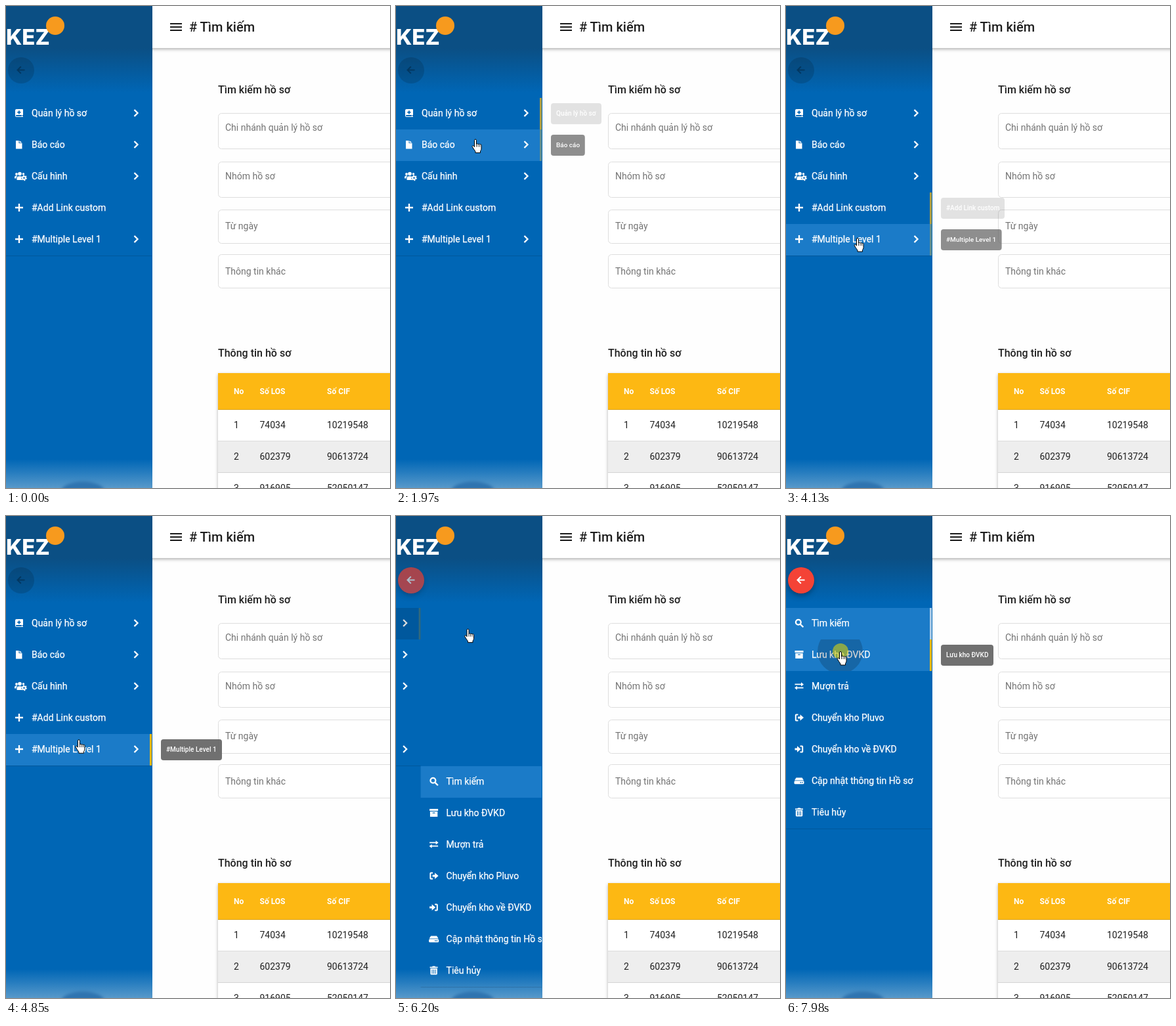
These frames come from a looping animation (585x734 px, 8 s). An HTML page:

```html
<!DOCTYPE html>
<html lang="vi">
<head>
<meta charset="utf-8">
<title>Menu</title>
<style>
html, body { margin: 0; width: 100%; height: 100%; overflow: hidden; background: #fff; }
body { font-family: Roboto, sans-serif; }
#stage { position: absolute; left: 0; top: 0; width: 585px; height: 734px; overflow: hidden; background: #fefefe; }
#stage div, #stage svg { position: absolute; }
#page { left: 0; top: 0; }
#side {
  left: 0; top: 0; width: 223px; height: 734px; overflow: hidden;
  background:
    linear-gradient(rgba(150, 190, 220, 0) 690px, rgba(150, 190, 220, .25) 710px, rgba(160, 195, 220, .55) 734px),
    linear-gradient(#0b4f84 64px, #0066b5 132px);
}
#hill { left: 84px; top: 724px; width: 66px; height: 30px; border-radius: 50%; background: #2f74b0; filter: blur(2px); }
#brand { left: 0; top: 27px; font: 800 33px/40px Inter, sans-serif; color: #fff; }
#mark { left: 61px; top: 16px; width: 28px; height: 28px; border-radius: 50%; background: #f79a1e; }
.fab { left: 3px; top: 78px; width: 40px; height: 40px; border-radius: 50%; }
.fab svg { left: 0; top: 0; fill: none; stroke: currentColor; stroke-width: 2; }
#off { background: rgba(0, 0, 0, .14); color: rgba(0, 0, 0, .28); }
#on { background: #f44336; color: #fff; box-shadow: 0 3px 5px -1px rgba(0, 0, 0, .2), 0 5px 10px rgba(0, 0, 0, .16); }
#lists { left: 0; top: 140px; width: 222px; height: 594px; overflow: hidden; }
.list { left: 0; width: 222px; border-bottom: 1px solid rgba(0, 0, 0, .14); }
.row { left: 0; width: 222px; height: 48px; overflow: hidden; color: #fff; }
.row span {
  position: absolute; left: 39px; top: 0; white-space: nowrap;
  font-size: 14px; line-height: 46px; -webkit-text-stroke: .25px #fff;
}
.row svg { left: 10px; top: 13px; width: 20px; height: 20px; overflow: visible; fill: currentColor; }
.row svg.chev { left: 188px; }
.line { fill: none; stroke: currentColor; stroke-width: 2.3; }
.bar { right: 0; top: 0; width: 3px; height: 48px; background: #fdb813; }
.ripple { border-radius: 50%; background: #000; }
.tip {
  left: 236px; height: 32px; padding: 0 8px; border-radius: 4px; white-space: nowrap;
  font: 500 10px/32px Roboto, sans-serif; color: #fff; background: rgba(97, 97, 97, .9); transform-origin: 0 50%;
}
#spot { width: 24px; height: 24px; margin: -12px 0 0 -12px; border-radius: 50%; background: rgba(235, 220, 0, .55); }
#cursor { left: 0; top: 0; }
#cursor svg { overflow: visible; fill: #fff; stroke: #000; }
</style>
</head>
<body>
<div id="stage">
  <svg id="page" width="585" height="734"></svg>
  <div id="side">
    <div id="hill"></div>
    <div id="brand">KEZ</div>
    <div id="mark"></div>
    <div id="off" class="fab"></div>
    <div id="on" class="fab"></div>
    <div id="lists"></div>
  </div>
  <div id="tips"></div>
  <div id="spot"></div>
  <div id="cursor">
    <svg id="arrow" width="14" height="20"><path d="M.5.5v16l3.7-3.5 2.5 5.8 2.5-1-2.5-5.7h5z"/></svg>
    <svg id="hand" width="17" height="23" style="left:-5.5px;top:-.5px">
      <path d="M4 2a1.5 1.5 0 0 1 3 0v6a1.4 1.4 0 0 1 2.6.2a1.4 1.4 0 0 1 2.5.5a1.3 1.3 0 0 1 2.4.8v5c0 2-1 3-1.5 4v2.5H5.5v-2C4 17 2 14 .8 11.8c-.6-1.3 1-2.3 2-1.2L4 12z"/>
      <path d="M7 8v4M9.6 8.5V12M12.1 9v3" stroke-width=".8"/>
    </svg>
  </div>
</div>
<script>
const LOOP = 8000, ROW = 48, TOP = 140, EDGE = 222;
const SLIDE = 6000, SLIDE_END = 6450, FADE = 260;
const $ = id => document.getElementById(id);
const clamp = v => Math.max(0, Math.min(1, v));
const easeOut = p => 1 - (1 - clamp(p)) ** 3;

// Page content
const text = (x, y, size, str, fill = '#212121', weight = 400) =>
  `<text x="${x}" y="${y}" font-size="${size}" font-weight="${weight}" fill="${fill}">${str}</text>`;
const rect = (x, y, w, h, fill, more = '') =>
  `<rect x="${x}" y="${y}" width="${w}" height="${h}" fill="${fill}" ${more}/>`;
const field = (y, h, base, label) =>
  rect(323.5, y + .5, 300, h - 1, '#fff', 'rx="5" stroke="#dedede"') + text(334, base, 14, label, '#737373');
const cells = (y, list, size = 14, fill, weight) =>
  list.map((s, i) => text([347, 386.5, 489][i], y, size, s, fill, weight)).join('');

$('page').innerHTML = `
  <defs>
    <filter id="soft" x="-10%" y="-40%" width="120%" height="200%"><feDropShadow dx="0" dy="2" stdDeviation="2.5" flood-opacity=".3"/></filter>
  </defs>
  ${rect(200, 0, 420, 64, '#fff', 'filter="url(#soft)"')}
  ${[26, 31, 36].map(y => rect(250, y, 18, 2, '#1c1c1c')).join('')}
  ${text(279, 39, 20, '# Tìm kiếm', '#1e1e1e', 500)}
  ${text(323, 133, 16, 'Tìm kiếm hồ sơ', '#212121', 500)}
  ${field(163, 55, 190, 'Chi nhánh quản lý hồ sơ')}
  ${field(237, 55, 264, 'Nhóm hồ sơ')}
  ${field(310, 52, 340, 'Từ ngày')}
  ${field(378, 52, 409, 'Thông tin khác')}
  ${text(323, 534, 16, 'Thông tin hồ sơ', '#212121', 500)}
  ${rect(323, 559, 300, 200, '#fff', 'filter="url(#soft)"')}
  ${rect(323, 559, 300, 55, '#fdb813')}
  ${rect(323, 614, 300, 1, '#d9a21c')}
  ${rect(323, 662, 300, 49, '#eee')}
  ${rect(323, 662, 300, 1, '#dcdcdc')}
  ${rect(323, 710, 300, 1, '#d4d4d4')}
  ${cells(591, ['No', 'Số LOS', 'Số CIF'], 12, '#fff', 700)}
  ${cells(643, ['1', '74034', '10219548'])}
  ${cells(691, ['2', '602379', '90613724'])}
  ${cells(739, ['3', '916905', '52050147'])}`;

// Menu
const line = d => `<path class="line" d="${d}"/>`;
const solid = d => `<path fill-rule="evenodd" d="${d}"/>`;
const ICONS = {
  book: solid('M6 4h9q1 0 1 1v8h-1v2h1v1H6a2 2 0 0 1-2-2V6a2 2 0 0 1 2-2zm3 2.2v1.7H7.3v1.8H9v1.7h1.8V9.700h1.7V7.900h-1.700V6.200zM6 13a1 1 0 0 0 0 2h8v-2z'),
  file: solid('M5 4h4.500v4H14.500v8.500H5zM10.500 4l4 3.200h-4z'),
  team: '<circle cx="6" cy="7" r="1.900"/><circle cx="11" cy="6.500" r="2.800"/><circle cx="16.500" cy="6.800" r="1.700"/>' +
    solid('M3 12q0-2.500 2.500-2.500h2q-2 1.500-2 4H3zM6.500 16v-2.500q0-3.200 3.500-3.200h2q1.500 0 1.700.7-1 2.500.8 5z') +
    '<circle cx="17.500" cy="12.800" r="2.300" fill="none" stroke="currentColor" stroke-width="2"/>' +
    '<circle cx="17.500" cy="12.800" r="3.700" fill="none" stroke="currentColor" stroke-width="1.400" stroke-dasharray="1.900 1.970"/>',
  plus: line('M10 4v12M4 10h12'),
  search: '<circle class="line" cx="8.800" cy="8.800" r="3.900"/>' + line('M11.600 11.600L16.300 16.300'),
  archive: solid('M3.500 4h13v3h-13zM4.300 8h11.400v8H4.300zM8 9.500v1.200h4V9.500z'),
  swap: solid('M3.500 6.500h9.500V4.300L17 7.400l-4 3V8.300H3.500zM16.500 11.700H7V9.700l-4 3.100 4 3v-2.200h9.500z'),
  out: solid('M8.500 4.500v2H5.800v7h2.700v2H5.500q-1.700 0-1.700-1.700V6.200q0-1.700 1.700-1.700zM8 8.500h3.500V5.300L17 10l-5.500 4.700v-3.200H8z'),
  in: solid('M11.500 4.500v2h2.700v7h-2.700v2h3q1.700 0 1.700-1.700V6.200q0-1.700-1.700-1.700zM3.500 8.500H7V5.300L12.500 10 7 14.700v-3.200H3.500z'),
  disk: solid('M5.500 5.500h9l2.500 4H3zM4 10.200h12q1.500 0 1.500 1.500v2q0 1.500-1.500 1.500H4q-1.500 0-1.500-1.500v-2q0-1.500 1.500-1.500zM11.500 12v1.500H13V12zm2.500 0v1.500h1.500V12z'),
  trash: solid('M4 4.600h3.500l.7-1h3.600l.7 1H16v1.600H4zM4.800 7h10.400v8q0 1.500-1.500 1.500H6.300q-1.500 0-1.500-1.500zM7 8.500v6.500h1V8.500zm2.500 0v6.500h1V8.500zm2.500 0v6.500h1V8.500z')
};
const MENUS = [
  [['book', 'Quản lý hồ sơ', 1], ['file', 'Báo cáo', 1], ['team', 'Cấu hình', 1],
   ['plus', '#Add Link custom'], ['plus', '#Multiple Level 1', 1]],
  [['search', 'Tìm kiếm'], ['archive', 'Lưu kho ĐVKD'], ['swap', 'Mượn trả'], ['out', 'Chuyển kho Pluvo'],
   ['in', 'Chuyển kho về ĐVKD'], ['disk', 'Cập nhật thông tin Hồ sơ'], ['trash', 'Tiêu hủy']]
];
const CHEVRON = `<svg class="chev" viewBox="0 0 20 20">${line('M7.500 5l5 5-5 5')}</svg>`;

function add(parent, cls, html = '') {
  const el = document.createElement('div');
  el.className = cls;
  el.innerHTML = html;
  return parent.appendChild(el);
}

const rows = [];
const lists = MENUS.map((items, menu) => {
  const list = add($('lists'), 'list');
  list.style.height = items.length * ROW + 'px';
  items.forEach(([icon, label, more], i) => {
    const el = add(list, 'row',
      `<svg viewBox="0 0 20 20">${ICONS[icon]}</svg><span>${label}</span>${more ? CHEVRON : ''}`);
    el.style.top = i * ROW + 'px';
    const tip = add($('tips'), 'tip', label);
    tip.style.top = TOP + i * ROW + 8 + 'px';
    const active = menu === 1 && i === 0;
    const bar = add(el, 'bar');
    if (active) bar.style.background = '#a9cbe8';
    rows.push({ menu, i, el, tip, bar, active, spans: [] });
  });
  return list;
});
for (const id of ['off', 'on'])
  $(id).innerHTML = '<svg width="40" height="40"><path d="M25.500 19.500H15M19.800 14.200l-5.300 5.300 5.300 5.300"/></svg>';

// Pointer path: time, x, y
const PATH = [
  [70, 552, 714], [140, 498, 580], [210, 428, 449], [280, 352, 360], [420, 262, 272], [590, 212, 226],
  [760, 140, 206], [900, 138, 203], [1040, 136.5, 184.500], [1180, 127, 169], [1780, 126, 170],
  [1970, 120.500, 202.500], [2110, 119, 207], [2310, 118, 210], [2520, 114, 240], [2950, 110, 262],
  [3070, 108, 275], [3190, 107, 292], [3470, 106, 316], [3700, 106, 318], [3730, 105, 318],
  [3930, 104.500, 319], [4000, 104.500, 319], [4130, 108.500, 353], [4330, 110, 363], [4790, 110, 362], [4930, 111, 312],
  [5070, 111, 220], [5260, 111, 181], [5400, 109, 171], [6680, 109, 172], [6820, 108.500, 174.500],
  [7150, 108, 178], [7290, 102, 230], [7430, 95, 273], [7570, 90, 246], [7710, 84, 215], [7910, 82.500, 206]
];

function pointer(t) {
  const n = PATH.findIndex(p => p[0] > t);
  if (n < 0) return PATH[PATH.length - 1].slice(1);
  if (n === 0) return PATH[0].slice(1);
  const [t0, x0, y0] = PATH[n - 1], [t1, x1, y1] = PATH[n], p = (t - t0) / (t1 - t0);
  return [x0 + (x1 - x0) * p, y0 + (y1 - y0) * p];
}

// Hover periods follow from the path
for (let t = 70, last = null; t < LOOP; t += 5) {
  const [x, y] = pointer(t);
  const menu = t < SLIDE ? 0 : t < SLIDE_END ? -1 : 1;
  const i = x < EDGE ? Math.floor((y - TOP) / ROW) : -1;
  const now = rows.find(r => r.menu === menu && r.i === i) || null;
  if (now && now !== last) now.spans.push([t, t]);
  if (now) now.spans[now.spans.length - 1][1] = t + 5;
  last = now;
}

const CLICKS = [[5925, rows[0]], [7972, rows[6]]].map(([at, row]) => {
  const [x, y] = pointer(at);
  return { at, x, y: y - TOP - row.i * ROW, el: add(row.el, 'ripple') };
});

function drawRow(r, t) {
  let hover = false, bar = 0, tip = 0, size = 1;
  for (const [from, to] of r.spans) {
    if (t < from) continue;
    if (t < to) hover = true;
    const peak = clamp((Math.min(t, to) - from) / FADE);
    bar = Math.max(bar, peak - Math.max(0, t - to) / FADE);
    const shown = easeOut((Math.min(t, to) - from) / 200);
    const alpha = shown * clamp(1 - (t - to) / 100);
    if (alpha > tip) {
      tip = alpha;
      size = shown < .5 ? shown * 1.980 : .98 + shown * .02;
    }
  }
  r.el.style.backgroundColor = hover || r.active ? '#1b7bc8' : 'transparent';
  r.bar.style.opacity = r.active ? 1 : clamp(bar);
  r.tip.style.opacity = tip;
  r.tip.style.transform = `scale(${size})`;
}

function drawClick(c, t) {
  const age = t - c.at, r = 143 * easeOut((age + 30) / 450);
  const s = c.el.style;
  s.left = c.x - r + 'px';
  s.top = c.y - r + 'px';
  s.width = s.height = 2 * r + 'px';
  s.opacity = age < 0 ? 0 : .17 * clamp(1 - (age - 200) / 350);
  return age >= 0 && age < 140;
}

function draw(t) {
  const [x, y] = pointer(t);
  rows.forEach(r => drawRow(r, t));

  const p = easeOut((t - SLIDE) / (SLIDE_END - SLIDE));
  lists[0].style.visibility = t < SLIDE_END ? 'visible' : 'hidden';
  lists[0].style.transform = `translateX(${-EDGE * p}px)`;
  lists[1].style.visibility = t >= SLIDE ? 'visible' : 'hidden';
  lists[1].style.top = (t < SLIDE_END ? MENUS[0].length * ROW + 1 : 0) + 'px';
  lists[1].style.transform = `translateX(${EDGE * (1 - p)}px)`;
  $('on').style.opacity = clamp((t - SLIDE) / 300);

  const pressed = CLICKS.map(c => drawClick(c, t)).includes(true);
  $('spot').style.visibility = pressed ? 'visible' : 'hidden';
  $('spot').style.left = x + 'px';
  $('spot').style.top = y + 'px';

  $('cursor').style.display = t < 70 ? 'none' : 'block';
  $('cursor').style.transform = `translate(${x}px, ${y}px)`;
  $('hand').style.display = x < EDGE ? 'block' : 'none';
  $('arrow').style.display = x < EDGE ? 'none' : 'block';
}

const start = performance.now();
function tick() {
  draw((performance.now() - start) % LOOP);
  requestAnimationFrame(tick);
}
draw(0);
requestAnimationFrame(tick);
</script>
</body>
</html>
```
